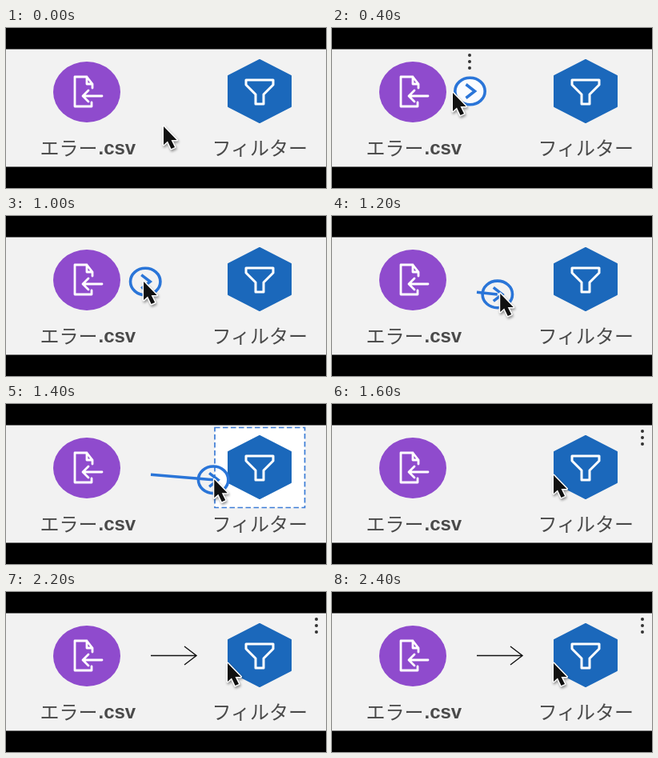
An HTML page for the animation above (2.5 s loop, 400x200 px).

```html
<!DOCTYPE html>
<html lang="ja">
<head>
<meta charset="utf-8">
<style>
  html, body { margin: 0; width: 100%; height: 100%; overflow: hidden; background: #000; }
  svg { display: block; width: 400px; height: 200px; }
  text { font: 24px "Noto Sans CJK JP", "Noto Sans CJK", sans-serif; fill: #4a4a4a; }
  .latin { font: bold 24px "Liberation Sans", Arial, sans-serif; }
  .icon { fill: none; stroke: #fff; stroke-linejoin: round; stroke-linecap: round; }
  .blue { fill: none; stroke: #2a75d8; stroke-width: 3.5; }
  #cursor { filter: drop-shadow(1px 2px 1.5px #0006); }
</style>
</head>
<body>
<svg viewBox="0 0 400 200">
  <rect y="26.5" width="400" height="147" fill="#f2f2f2"/>
  <rect id="target" x="261" y="29.5" width="112.5" height="100" fill="#fff" stroke="#3d7dd6" stroke-width="1.7" stroke-dasharray="6.5 3.5"/>

  <ellipse cx="101" cy="80" rx="42" ry="38" fill="#8f4bcd"/>
  <path class="icon" stroke-width="2.8" d="M108 75V70L101 61H86V98H107V93M101 61V70H108M120 85H97M103 78L96 85L103 92"/>
  <text x="42.5" y="159">エラー</text>
  <text class="latin" x="115.5" y="158">.csv</text>

  <path d="M317 40L356 60V98L317 118L278 98V60Z" fill="#1b68bb" stroke="#1b68bb" stroke-width="2" stroke-linejoin="round"/>
  <path class="icon" stroke-width="3" d="M300 65H334V71L322 83V95H312V83L300 71Z"/>
  <text x="257.5" y="159">フィルター</text>

  <path id="dots" d="M0 34v.01M0 42v.01M0 50v.01" stroke="#333" stroke-width="4" stroke-linecap="round"/>
  <path id="arrow" d="M181 79.5H237M223 68L238 79.5L223 91" fill="none" stroke="#111" stroke-width="1.4"/>
  <path id="link" class="blue"/>
  <g id="port" class="blue">
    <ellipse id="ring" rx="18.7" ry="16.8"/>
    <path d="M-5 -8.5L6 0L-5 8.5"/>
  </g>
  <path id="cursor" d="M0 0V23L5 18.5L9.5 28L14 26L9.5 17H16.5Z" fill="#111" stroke="#fff" stroke-width="3" stroke-linejoin="round" paint-order="stroke"/>
</svg>
<script>
const [target, dots, arrow, link, port, ring, cursor] =
  ['target', 'dots', 'arrow', 'link', 'port', 'ring', 'cursor'].map(id => document.getElementById(id));

// Smooth step from 0 to 1 between two times
function ease(t, from, to) {
  const u = Math.min(1, Math.max(0, (t - from) / (to - from)));
  return u * u * (3 - 2 * u);
}
const show = (node, on) => node.style.display = on ? '' : 'none';
const move = (node, x, y) => node.setAttribute('transform', `translate(${x} ${y})`);

function draw(elapsed) {
  const t = Math.floor(elapsed % 2500 / 100) * 100;
  const hover = ease(t, 0, 300), press = ease(t, 500, 700), drag = ease(t, 950, 1550);
  const sag = Math.sin(Math.PI * drag);
  const px = 172.5 + 106 * drag - 6 * sag;
  const py = 79 + 2 * press + 8 * drag + 15 * sag;

  move(cursor, 197 - 46 * hover + 19 * press + 107 * drag, 123 - 42 * hover + 8 * drag + 14 * sag);
  move(port, px, py);
  move(dots, t < 1600 ? 172 : 388, 0);
  link.setAttribute('d', `M181 ${101 - 15 * drag}L${px} ${py}`);
  ring.style.strokeWidth = t >= 700 && t < 1000 ? 5 : 3.6;
  ring.style.fill = t < 1000 ? '#fafcff' : 'none';

  show(dots, t >= 200 && t < 700 || t >= 1600);
  show(port, t >= 200 && t < 1600);
  show(link, t >= 1100 && t < 1600);
  show(target, t >= 1400 && t < 1600);
  show(arrow, t >= 2000);
}

const start = performance.now();
function tick() {
  draw(performance.now() - start);
  requestAnimationFrame(tick);
}
tick();
</script>
</body>
</html>
```
